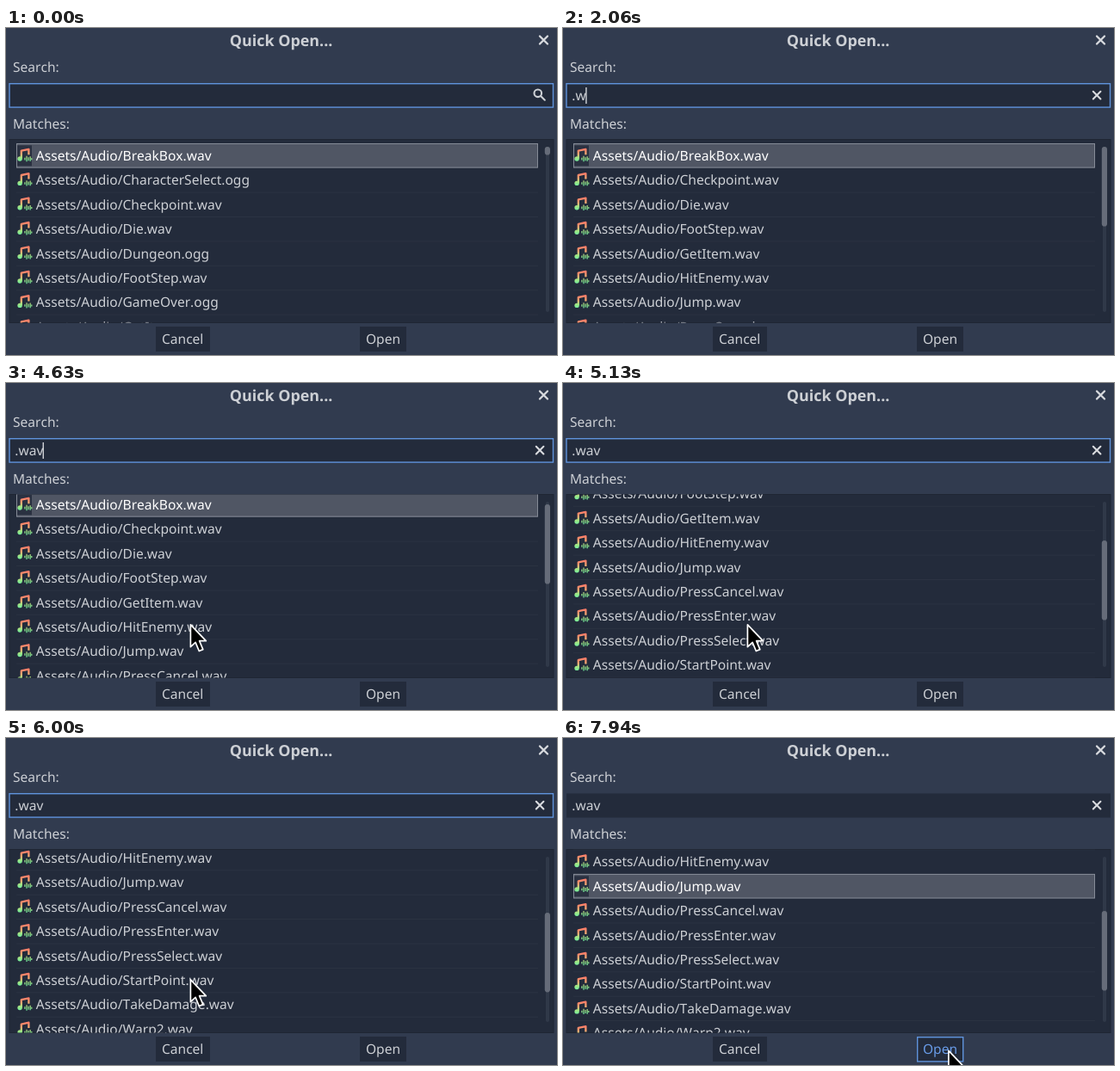
An HTML page for the animation above (8250 ms loop, 640 px wide and 380 px high).

```html
<!DOCTYPE html>
<html lang="en">
<head>
<meta charset="utf-8">
<title>Quick Open</title>
<style>
  html, body { margin: 0; width: 100%; height: 100%; overflow: hidden; background: #313b4f; }
  svg { display: block; width: 640px; height: 380px; }
  text {
    font: 15.56px "Noto Sans", "Open Sans", sans-serif;
    font-kerning: none;
    text-rendering: geometricPrecision;
    fill: #cdd0d5;
  }
  .title { font-weight: 700; font-size: 17.9px; text-anchor: middle; }
  .mid { text-anchor: middle; }
  .field { fill: #232b3b; }
  .cross { fill: none; stroke: #d9dbdf; stroke-width: 2.1; stroke-linecap: round; }
  .accent { fill: none; stroke: #5f93dc; stroke-width: 1.4; }
  .sel rect { fill: #50566a; fill: #505664; stroke: #858b97; stroke-width: 1; }
  .sel .patch { fill: #2a3141; stroke: none; }
  .line { stroke: #fff; stroke-opacity: .035; }
  .chosen { fill: #fff; }
  .pressed { fill: #699ce8; }
</style>
</head>
<body>
<svg viewBox="0 0 640 380">
  <defs>
    <clipPath id="view"><rect x="4" y="129.5" width="632" height="213"/></clipPath>
    <linearGradient id="tint" gradientUnits="userSpaceOnUse" x1="0" y1="1" x2="0" y2="16">
      <stop offset="0" stop-color="#ff7a68"/>
      <stop offset=".4" stop-color="#f3a872"/>
      <stop offset=".68" stop-color="#a5e683"/>
      <stop offset="1" stop-color="#6cefa0"/>
    </linearGradient>
    <g id="note" fill="none" stroke="url(#tint)">
      <path d="M5 12.5V3.4L13.6 1.6V8" stroke-width="2.3" stroke-linejoin="round"/>
      <circle cx="3.3" cy="12.8" r="2.7" fill="url(#tint)" stroke="none"/>
      <path d="M9.1 11.6v2.6M11.2 9.6v6.4M13.3 11v4M15.4 10v5.6M17 12v2" stroke-width="1.2"/>
    </g>
  </defs>

  <rect width="640" height="380" fill="#313b4f"/>
  <text class="title" x="319.6" y="20.8">Quick Open...</text>
  <path class="cross" d="M620 9.5l9 9m0-9l-9 9" style="stroke-width:2.3"/>
  <text x="8" y="51.4">Search:</text>
  <text x="8" y="117">Matches:</text>

  <rect class="field" x="4" y="64.5" width="632" height="28"/>
  <rect id="focus" class="accent" x="4" y="64.7" width="631.5" height="27.4"/>
  <text id="query" x="10.3" y="84"></text>
  <rect id="caret" y="69" width="1.3" height="19" fill="#dfe1e5"/>
  <g id="lens" fill="none" stroke="#cdd0d5" stroke-width="2.1" stroke-linecap="round">
    <circle cx="617.8" cy="75.8" r="4.3"/>
    <path d="M621.3 79.3l4.5 4.4"/>
  </g>
  <path id="clear" class="cross" d="M615.8 73.8l8.6 8.6m0-8.6l-8.6 8.6"/>

  <rect x="4" y="129.5" width="632" height="213" fill="#232b3b" stroke="#1f2634"/>
  <g clip-path="url(#view)">
    <g id="all"></g>
    <g id="wav"></g>
  </g>
  <rect x="627" y="138" width="4" height="192" rx="2" fill="#303949"/>
  <rect id="thumb" x="625.8" width="6.2" rx="3.1" fill="#666c79"/>

  <rect class="field" x="174" y="347" width="63" height="29"/>
  <text class="mid" x="205.2" y="367.4">Cancel</text>
  <rect class="field" x="411" y="347" width="54" height="29"/>
  <rect id="ring" class="accent" x="411.7" y="347.7" width="53" height="28.2"/>
  <text id="open" class="mid" x="438" y="367.4">Open</text>

  <path id="pointer" d="M.9 1.4V27.2L6.6 21.9 10.8 32 15.3 30.1 11.1 20.2H18.8Z"
        fill="#000" stroke="#fff" stroke-width="1.7" stroke-linejoin="round"/>
</svg>
<script>
const LOOP = 8250, TICK = 62.5;
const PITCH = 28.4, FIRST = 148.4;
const NS = "http://www.w3.org/2000/svg";
const $ = id => document.getElementById(id);

const wavNames = ("BreakBox Checkpoint Die FootStep GetItem HitEnemy Jump PressCancel PressEnter " +
  "PressSelect StartPoint TakeDamage Warp2 Warp3 Warp").split(" ").map(n => n + ".wav");
const allNames = ("BreakBox.wav CharacterSelect.ogg Checkpoint.wav Die.wav Dungeon.ogg " +
  "FootStep.wav GameOver.ogg GetItem.wav").split(" ");

// [time, value] steps
const typed = [[0, ""], [1690, "."], [2000, ".w"], [2250, ".wa"], [2440, ".wav"]];
const caretOn = [[0, 0], [60, 1], [560, 0], [1060, 1], [1560, 0], [1690, 1], [2750, 0], [3310, 1],
  [3810, 0], [4310, 1], [4810, 0], [5310, 1], [5810, 0], [6310, 1], [6750, 0]];
const CLICK = 6750, PRESS = 7880;

// [time, value...] keys
const scroll = [[4380, 0], [4630, 7], [4880, 55], [5130, 105], [5250, 121], [5310, 128],
  [5560, 210], [5690, 231], [5750, 231], [6000, 151], [6130, 146.5]];
const path = [[3500, 428, 2], [4380, 213.5, 279.5], [6130, 213.5, 279.5], [6630, 205, 167],
  [7070, 205, 167], [7750, 447, 362]];

function add(parent, tag, attrs, text) {
  const el = document.createElementNS(NS, tag);
  for (const k in attrs) el.setAttribute(k, attrs[k]);
  if (text) el.textContent = text;
  return parent.appendChild(el);
}

function buildList(group, names) {
  const bar = add(group, "g", { class: "sel" });
  add(bar, "rect", { x: 12.5, y: FIRST - 13.9, width: 605, height: 27.6 });
  add(bar, "rect", { class: "patch", x: 13, y: FIRST - 12, width: 17, height: 24 });
  const labels = names.map((name, i) => {
    const y = FIRST + i * PITCH;
    add(group, "path", { class: "line", d: `M12 ${y + 14.3}H618` });
    add(group, "use", { href: "#note", x: 12.8, y: y - 9.2 });
    return add(group, "text", { x: 34.8, y: y + 5.5 }, "Assets/Audio/" + name);
  });
  return index => {
    bar.setAttribute("transform", `translate(0 ${index * PITCH})`);
    labels.forEach((el, i) => el.classList.toggle("chosen", i === index));
  };
}

const stepAt = (steps, t) => steps.filter(s => s[0] <= t).pop()[1];
const smooth = p => p * p * (3 - 2 * p);

function keyAt(keys, t, ease = p => p) {
  if (t <= keys[0][0]) return keys[0].slice(1);
  const n = keys.findIndex(k => k[0] > t);
  if (n < 0) return keys[keys.length - 1].slice(1);
  const a = keys[n - 1], b = keys[n];
  const p = ease((t - a[0]) / (b[0] - a[0]));
  return a.slice(1).map((v, i) => v + (b[i + 1] - v) * p);
}

const show = (id, on) => { $(id).style.display = on ? "" : "none"; };
const move = (id, x, y) => $(id).setAttribute("transform", `translate(${x} ${y})`);

buildList($("all"), allNames)(0);
const selectWav = buildList($("wav"), wavNames);
const caretX = { "": 10.6, ".": 14.8, ".w": 26.3, ".wa": 35, ".wav": 42.6 };

function draw(ms) {
  const t = Math.floor((ms + 2.6) / TICK) * TICK + 3;
  const query = stepAt(typed, t);
  const filtered = query.length > 1;
  const [offset] = keyAt(scroll, t);

  $("query").textContent = query;
  $("caret").setAttribute("x", caretX[query]);
  show("caret", stepAt(caretOn, t));
  show("focus", t < CLICK);
  show("lens", !query);
  show("clear", query);

  show("all", !filtered);
  show("wav", filtered);
  move("wav", 0, -offset);
  selectWav(t < CLICK ? 0 : 6);
  $("thumb").setAttribute("y", 138 + offset * .43);
  $("thumb").setAttribute("height", filtered ? 92.5 : 9.5);

  show("ring", t >= PRESS);
  $("open").classList.toggle("pressed", t >= PRESS);
  show("pointer", t >= 3310);
  move("pointer", ...keyAt(path, t, smooth));
}

const start = performance.now();
function loop() {
  draw((performance.now() - start) % LOOP);
  requestAnimationFrame(loop);
}
draw(0);
requestAnimationFrame(loop);
</script>
</body>
</html>
```
